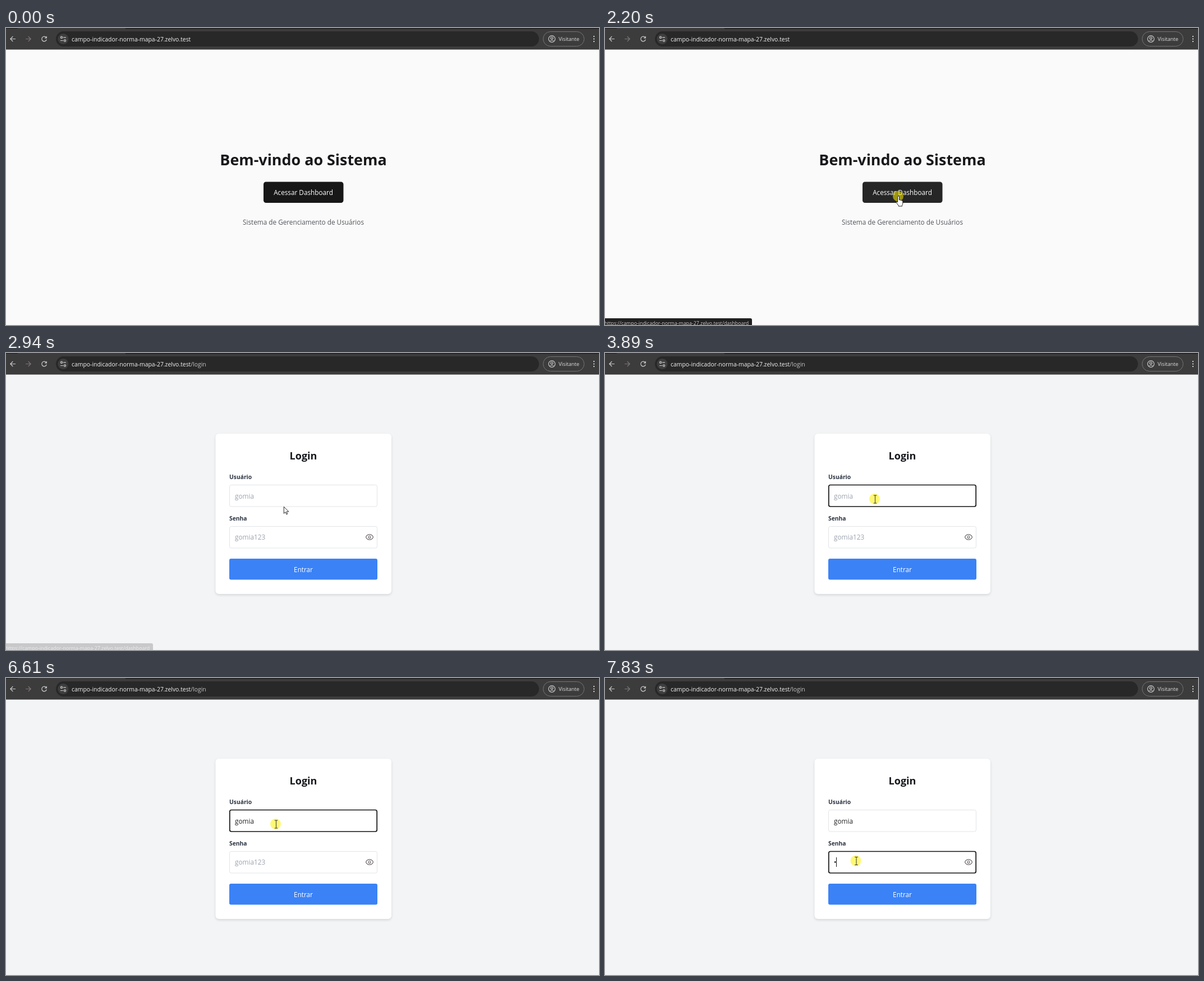
Recreate the animation shown at these times as an HTML page. Size 1057 by 530 pixels, loop 8000 ms.

```html
<!DOCTYPE html>
<html lang="pt-BR">
<head>
<meta charset="utf-8">
<title>Login</title>
<style>
html, body { margin: 0; height: 100%; overflow: hidden; }
svg { display: block; width: 100vw; height: 100vh; }
text { font: 11.75px "Open Sans", "Noto Sans", sans-serif; white-space: pre; }
.mid { text-anchor: middle; }
.bold { font-weight: 700; }
.line { fill: none; stroke: #c9c9c9; stroke-width: 1.2; }
#card { filter: drop-shadow(0 2px 2px rgba(0, 0, 0, .12)); }
</style>
</head>
<body>
<svg viewBox="0 0 1057 530">
  <g id="home">
    <rect y="38" width="1057" height="492" fill="#fafafa"/>
    <text class="mid bold" x="530" y="245" style="font-size:26.9px" fill="#18181b">Bem-vindo ao Sistema</text>
    <rect id="access" x="459" y="274.5" width="142.5" height="37.5" rx="4.5"/>
    <text class="mid" x="530" y="298" fill="#fff">Acessar Dashboard</text>
    <text class="mid" x="530" y="351" fill="#52565c">Sistema de Gerenciamento de Usuários</text>
  </g>

  <g id="login">
    <rect y="38" width="1057" height="492" fill="#f3f4f6"/>
    <rect id="card" x="373.5" y="144" width="313.5" height="286" rx="6" fill="#fff"/>
    <text class="mid bold" x="530" y="189.5" style="font-size:18px" fill="#15171c">Login</text>
    <g class="bold" style="font-size:10.3px" fill="#2b3340">
      <text class="bold" x="398" y="225" style="font-size:10.3px">Usuário</text>
      <text class="bold" x="398" y="299" style="font-size:10.3px">Senha</text>
    </g>
    <rect id="userBox" x="398.5" y="235.5" width="263" height="38.5" rx="3" fill="#fff"/>
    <rect id="passBox" x="398.5" y="309.5" width="263" height="38.5" rx="3" fill="#fff"/>
    <text id="user" x="408" y="259.5"></text>
    <text id="pass" x="408" y="333"></text>
    <rect id="caret" width="1" height="17" fill="#111"/>
    <g transform="translate(640.1 320.6) scale(.66)" fill="none" stroke="#6b6468" stroke-width="1.7">
      <path d="M2 12s3-7 10-7 10 7 10 7-3 7-10 7-10-7-10-7Z"/>
      <circle cx="12" cy="12" r="3"/>
    </g>
    <rect x="398" y="367" width="264" height="37.5" rx="3" fill="#3b82f6"/>
    <text class="mid" x="530" y="390.5" fill="#fff">Entrar</text>
  </g>

  <g id="browser">
    <rect width="1057" height="38.5" fill="#3c3c3c"/>
    <path d="M0 0H21V1H0ZM213 0H1057V1.5H213Z" fill="#1f1f1f"/>
    <path class="line" d="M17 19.5H8M12.3 15L7.8 19.5 12.3 24"/>
    <path class="line" d="M35 19.5H44M39.7 15L44.2 19.5 39.7 24" style="stroke:#7d7577"/>
    <path class="line" d="M71.6 17A4.3 4.3 0 1 0 72.3 20.5M72.3 14.8V17.9H69.2"/>
    <rect x="89" y="6" width="861" height="27" rx="13.5" fill="#282828"/>
    <circle cx="102" cy="19.5" r="9.5" fill="#3e3e3e"/>
    <g class="line">
      <path d="M102 16.8H107M97 22.5H102"/>
      <circle cx="99" cy="16.8" r="1.6"/>
      <circle cx="105" cy="22.5" r="1.6"/>
    </g>
    <text x="117" y="23.5" style="font-size:10.4px" fill="#f2f2f2">campo-indicador-norma-mapa-27.zelvo.test<tspan id="path" fill="#c4c4c4">/login</tspan></text>
    <rect class="line" x="957.5" y="6.5" width="73" height="26" rx="13" style="stroke:#767676;stroke-width:1"/>
    <g class="line">
      <circle cx="973" cy="19.5" r="5.8"/>
      <circle cx="973" cy="18" r="2"/>
      <path d="M969 23.6Q973 20.4 977 23.6"/>
    </g>
    <text x="985" y="23" style="font-size:9.2px" fill="#dedede">Visitante</text>
    <path d="M1047 14h2v2h-2zM1047 18.5h2v2h-2zM1047 23h2v2h-2z" fill="#d0d0d0"/>
  </g>

  <g id="status">
    <path d="M0 518H259Q262 518 262 521V530H0Z" fill="#202020"/>
    <text x="-1" y="530" style="font-size:8.8px" fill="#cdcdcd">https://campo-indicador-norma-mapa-27.zelvo.test/dashboard</text>
  </g>

  <g id="pointer">
    <circle id="halo" r="9.5" fill="#fff200" fill-opacity=".55"/>
    <path id="arrow" d="M0 0V12L2.8 9.4 4.6 13.6 6.5 12.8 4.7 8.7H8.6Z" fill="#fff" stroke="#111" stroke-width=".9"/>
    <path id="hand" d="M-.9 1.2a1.4 1.4 0 0 1 2.8 0V7q1.3-1 2.3.4 1.4-.9 2.2.6 1.9-.6 1.9 1.4V13q-.3 2-1.3 3.4V18H.7V16.8L-3.3 11.3q-.6-1.8 1-1.6l1.4 1.3Z" fill="#fff" stroke="#111" stroke-width=".9"/>
    <path id="beam" d="M-1.8-6.5H3.8M1 -6.5V7.5M-1.8 7.5H3.8" fill="none" stroke="#333"/>
  </g>
</svg>
<script>
const LOOP = 8000, PAGE = 2350, FOCUS_USER = 3350, FOCUS_PASS = 7230, TYPE_PASS = 7830;
const NAME = 'gomia', KEYS = [4220, 4480, 5660, 5880, 6080];
// start, end, steps, from, to
const MOVES = [
  [120, 670, 8, [884, 445], [522.5, 300]],
  [2680, 3020, 5, [522.5, 300], [480.5, 260.5]],
  [6610, 7160, 8, [480.5, 260.5], [447, 326]]
];
const $ = id => document.getElementById(id);
const show = (id, on) => $(id).style.display = on ? '' : 'none';
const set = (id, attrs) => { for (const k in attrs) $(id).setAttribute(k, attrs[k]); };
const within = (v, a, b) => v >= a && v < b;

function pointerAt(t) {
  const [start, end, steps, a, b] = MOVES.filter(m => t >= m[0]).pop() || MOVES[0];
  const p = Math.max(0, Math.min(1, Math.floor((t - start) / (end - start) * steps + .01) / steps));
  const e = p * p * (3 - 2 * p);
  return a.map((v, i) => v + (b[i] - v) * e);
}

function statusAlpha(t) {
  if (t < 870 || t >= 2960) return 0;
  if (t < 940) return .5;
  return t < 2680 ? 1 : .8 - .2 * Math.floor((t - 2680) / 70);
}

function outline(id, on) {
  const d = on ? .3 : 0;
  set(id, {
    stroke: on ? '#111' : '#e2e4e8', 'stroke-width': on ? 1.7 : 1,
    x: 398.5 + d, width: 263 - 2 * d
  });
}

function field(id, typed, hint) {
  $(id).textContent = typed || hint;
  set(id, { fill: typed ? '#222' : '#9ca3af' });
  return 408 + (typed ? $(id).getComputedTextLength() : 0);
}

function draw(t) {
  const home = t < PAGE, onPass = t >= FOCUS_PASS, onUser = t >= FOCUS_USER && !onPass;
  const [x, y] = pointerAt(t);
  const hover = home && within(x, 459, 601) && within(y, 274, 312);
  const beam = !home && within(x, 398, 662) && (within(y, 235, 274) || within(y, 309, 348));

  show('home', home);
  show('login', !home);
  show('path', !home);
  set('access', { fill: hover ? '#262626' : '#171717' });
  set('status', { opacity: statusAlpha(t) });

  outline('userBox', onUser);
  outline('passBox', onPass);
  const userEnd = field('user', NAME.slice(0, KEYS.filter(k => t >= k).length), NAME);
  const passEnd = field('pass', t >= TYPE_PASS ? '•' : '', NAME + '123');

  // The caret restarts its blink on focus and on every key.
  const last = [FOCUS_USER, ...KEYS, FOCUS_PASS, TYPE_PASS].filter(k => t >= k).pop();
  show('caret', last && Math.floor((t - last) / 530) % 2 === 0);
  set('caret', { x: Math.round(onPass ? passEnd : userEnd), y: onPass ? 320 : 246 });

  show('pointer', t >= 120);
  set('pointer', { transform: `translate(${x} ${y})` });
  show('halo', within(t, 2200, 2750) || within(t, 3620, 6680) || t >= 7230);
  show('hand', hover);
  show('beam', beam);
  show('arrow', !hover && !beam);
}

const began = performance.now();
function tick() {
  draw((performance.now() - began) % LOOP);
  requestAnimationFrame(tick);
}
tick();
</script>
</body>
</html>
```
